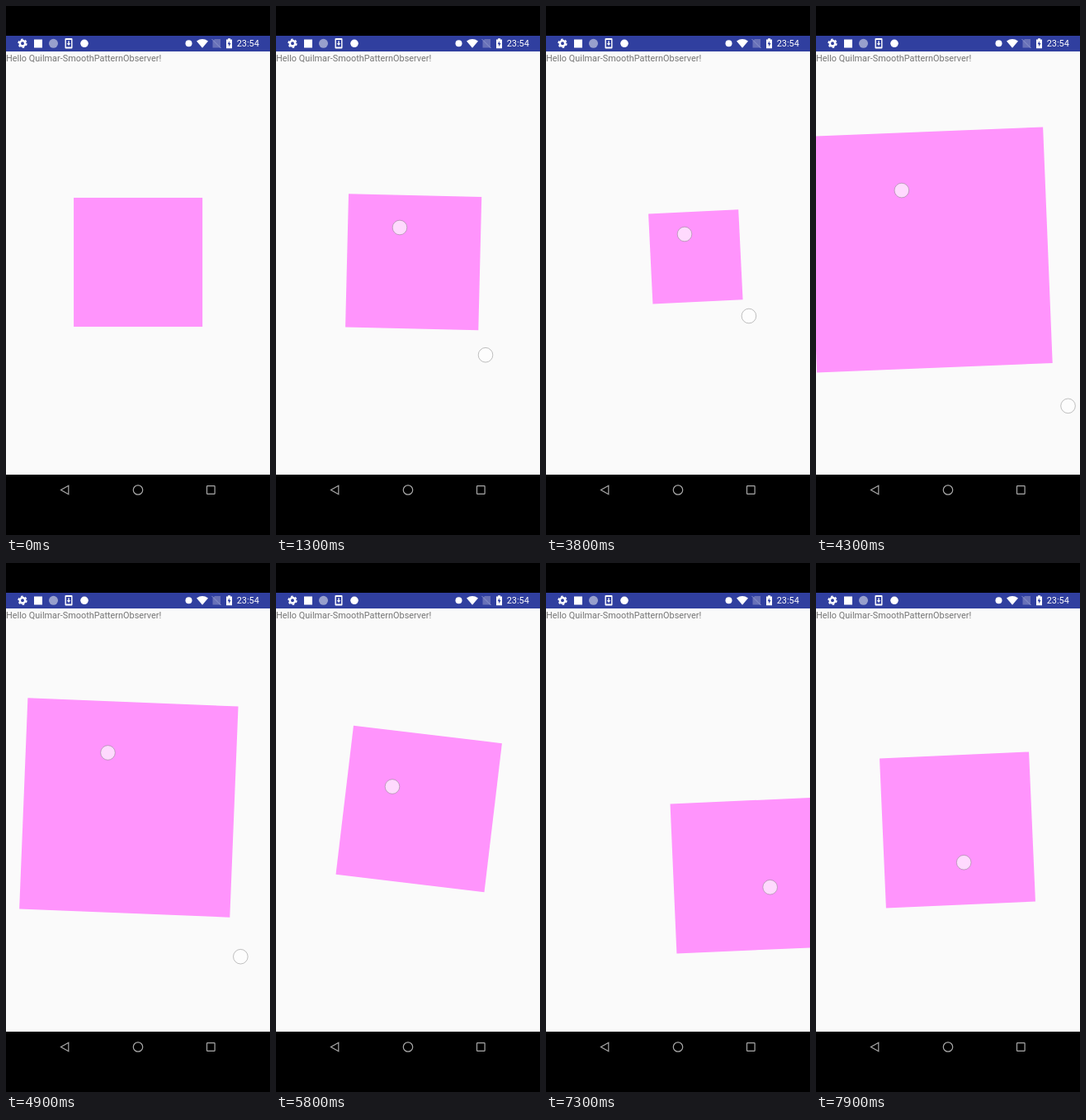
Write an HTML page that moves like this. It is 320x640 px and loops after 8 s.

```html
<!DOCTYPE html>
<html lang="en">
<head>
<meta charset="utf-8">
<title>Gesture demo</title>
<style>
  html, body { margin: 0; width: 100%; height: 100%; overflow: hidden; background: #000; }
  svg { display: block; width: 100%; height: 100%; }
  text { font-family: Roboto, sans-serif; font-size: 10.9px; }
  .touch { fill: rgba(255, 255, 255, .66); stroke: rgba(130, 130, 130, .5); stroke-width: 1; }
  .nav { fill: none; stroke: #a8a8a8; stroke-width: 1.2; }
</style>
</head>
<body>
<svg viewBox="0 0 320 640">
  <defs>
    <clipPath id="app"><rect y="55" width="320" height="512"/></clipPath>
  </defs>
  <rect width="320" height="640"/>
  <rect y="55" width="320" height="512" fill="#fafafa"/>
  <rect y="36" width="320" height="19" fill="#303f9f"/>

  <g fill="#fff">
    <circle cx="20" cy="45.3" r="3.2" fill="none" stroke="#fff" stroke-width="2.5"/>
    <circle cx="20" cy="45.3" r="4.9" fill="none" stroke="#fff" stroke-width="1.6" stroke-dasharray="2.6 2.53"/>
    <rect x="34" y="40.5" width="10" height="10"/>
    <circle cx="57.5" cy="45.3" r="5.5" fill="#98a0cc"/>
    <path d="M72.5 39h7q1 0 1 1v10.5q0 1-1 1h-7q-1 0-1-1V40q0-1 1-1zm.4 2v8.5h6.2V41zm2.4 1.2h1.4v3h1.6L76 48l-2.3-2.8h1.6z" fill-rule="evenodd"/>
    <circle cx="95" cy="45.3" r="4.8"/>
    <circle cx="221.5" cy="45.3" r="4"/>
    <path d="M231 42.4Q238 37.6 245 42.4L238 50.8z"/>
    <path d="M253 40h7v10.5h-9.5v-8z" fill="#6871b8"/>
    <path d="M249.5 40l11 11" stroke="#8c94cc"/>
    <path d="M269 39.3h3v1.2h2v10.7h-7V40.5h2zm1.9 3-2.4 4h1.6v3l2.4-4.2h-1.6z" fill-rule="evenodd"/>
    <text x="279.7" y="49.4">23:54</text>
  </g>

  <text x="0" y="66.5" fill="#757575">Hello Quilmar-SmoothPatternObserver!</text>

  <g clip-path="url(#app)">
    <rect id="box" x="-.5" y="-.5" width="1" height="1" fill="#ff94fc"/>
    <circle id="touchA" class="touch" r="8.8"/>
    <circle id="touchB" class="touch" r="8.8"/>
  </g>

  <g class="nav">
    <path d="M66.5 585.5l9.3-5.3v10.6z"/>
    <circle cx="160" cy="585.5" r="5.7"/>
    <rect x="243.5" y="580.7" width="9.6" height="9.6" rx=".6"/>
  </g>
</svg>
<script>
const LOOP = 8000, STEP = 100, RAD = Math.PI / 180;
const TOUCH = 500, RELEASE = 5600, DRAG = 7000, DRAG_LEG = 150;

// First finger, and the length and direction of the line to the second one.
const pinchKeys = [
  { at: TOUCH, x: 143, y: 270, span: 180, turn: 54.6 },
  { at: 900, x: 122, y: 232, span: 320, turn: 55 },    // spread
  { at: 1300, x: 150, y: 268, span: 186, turn: 56 },
  { at: 2300, x: 177.5, y: 304, span: 166, turn: 142.2 }, // swing left
  { at: 3300, x: 168, y: 276, span: 166, turn: 54 },   // and back
  { at: 3800, x: 168, y: 276, span: 126, turn: 51.8 }, // squeeze
  { at: 4500, x: 88, y: 210, span: 380, turn: 52.4 },  // wide spread
  { at: 5300, x: 159, y: 249, span: 209, turn: 61.4 }
];
// Evenly timed points of the dragged square's centre.
const dragPath = [[174, 298], [130, 360], [245, 378], [280, 270], [205, 181], [146, 197], [171.5, 323]];

const clamp = (v, low, high) => Math.min(Math.max(v, low), high);
const ease = (t, from, to) => {
  const u = clamp((t - from) / (to - from), 0, 1);
  return u * u * (3 - 2 * u);
};

function pinchAt(t) {
  const i = clamp(pinchKeys.findLastIndex(key => key.at <= t), 0, pinchKeys.length - 2);
  const p = pinchKeys[i], q = pinchKeys[i + 1], u = ease(t, p.at, q.at);
  const mix = name => p[name] + (q[name] - p[name]) * u;
  const a = [mix("x"), mix("y")], span = mix("span"), turn = mix("turn");
  const b = [a[0] + span * Math.cos(turn * RAD), a[1] + span * Math.sin(turn * RAD)];
  return { a, b, span, turn };
}

// The square keeps a fixed pose relative to the line between two fingers.
function pinchedBox({ a, b, span, turn }) {
  const size = .867 * span, lean = (turn - 191) * RAD;
  return {
    x: (a[0] + b[0]) / 2 + .31 * size * Math.cos(lean),
    y: (a[1] + b[1]) / 2 + .31 * size * Math.sin(lean),
    size, angle: turn - 54.6
  };
}

// Catmull-Rom curve through the drag points.
function dragAt(t) {
  const last = dragPath.length - 1;
  const s = clamp((t - DRAG) / DRAG_LEG, 0, last);
  const i = Math.min(Math.floor(s), last - 1), u = s - i;
  const [o, p, q, r] = [-1, 0, 1, 2].map(k => dragPath[clamp(i + k, 0, last)]);
  return [0, 1].map(k => {
    const m = (q[k] - o[k]) / 2, n = (r[k] - p[k]) / 2, d = q[k] - p[k];
    return p[k] + u * (m + u * (3 * d - 2 * m - n + u * (m + n - 2 * d)));
  });
}

// While dragging, the finger runs slightly ahead of the square.
function dragFinger(t) {
  const [x, y] = dragAt(t), [px, py] = dragAt(t - STEP);
  return [x + 1 + .3 * (x - px), y + 13 + .3 * (y - py)];
}

const [box, touchA, touchB] = ["box", "touchA", "touchB"].map(id => document.getElementById(id));

function place(touch, visible, [x, y]) {
  touch.style.display = visible ? "" : "none";
  touch.setAttribute("cx", x);
  touch.setAttribute("cy", y);
}

function draw(now) {
  const t = Math.floor(now % LOOP / STEP) * STEP;
  const pinch = pinchAt(t), pose = pinchedBox(pinch);
  const pinching = t >= TOUCH && t < RELEASE, dragging = t >= DRAG;
  if (dragging) [pose.x, pose.y] = dragAt(t);
  const angle = pose.angle - 9.3 * ease(t, 6000, 6700);
  box.setAttribute("transform", `translate(${pose.x} ${pose.y}) rotate(${angle}) scale(${pose.size})`);

  const finger = dragging ? dragFinger(t) : t < RELEASE ? pinch.a : [141, 270.5];
  place(touchA, t >= TOUCH, finger);
  place(touchB, pinching, pinch.b);
}

const start = performance.now();
function tick() {
  draw(performance.now() - start);
  requestAnimationFrame(tick);
}
tick();
</script>
</body>
</html>
```
